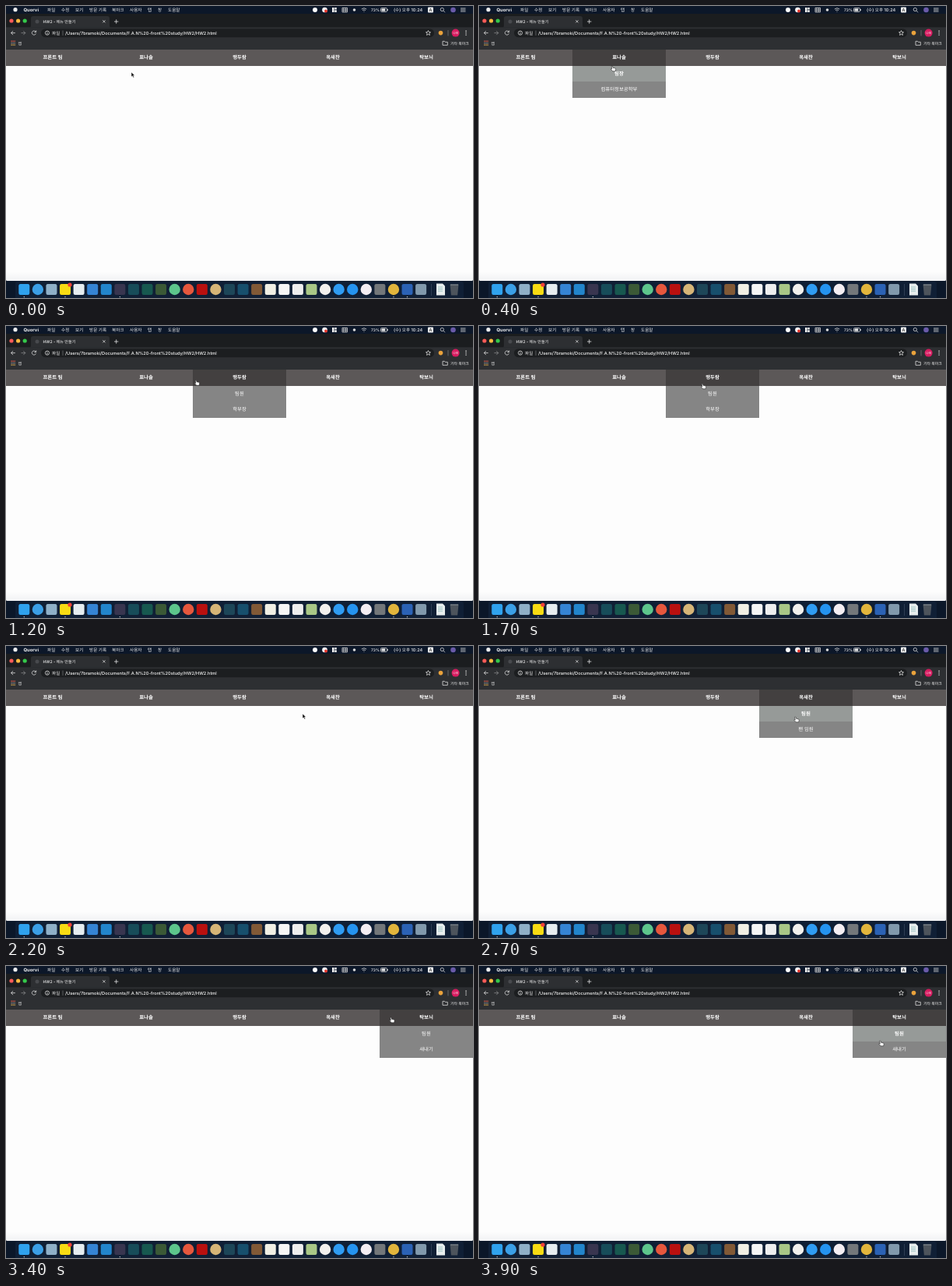
An HTML page that plays this animation: 600x375 px, repeating every 4 s.

```html
<!DOCTYPE html>
<html lang="ko">
<head>
<meta charset="utf-8">
<style>
html, body { margin: 0; width: 100%; height: 100%; overflow: hidden; background: #0b1729; }
svg { display: block; width: 600px; height: 375px; }
text { font: 5.6px Inter, "Noto Sans CJK KR", "Noto Sans CJK", sans-serif; fill: #f4f4f4; text-rendering: geometricPrecision; }
.line { fill: none; stroke: #dedede; stroke-width: .8; }
#nav text, #sub text { font-size: 6.4px; text-anchor: middle; fill: #fff; }
#nav text, #sub text.bold { font-weight: 700; }
</style>
</head>
<body>
<svg id="stage" viewBox="0 0 600 375">
  <defs>
    <linearGradient id="shade" x2="0" y2="1">
      <stop stop-color="#fdfdfd"/><stop offset="1" stop-color="#f1f2f4"/>
    </linearGradient>
  </defs>

  <!-- menu bar -->
  <rect width="600" height="10" fill="#0c1729"/>
  <circle cx="12" cy="4.7" r="2.6" fill="#eee"/>
  <g id="menus"></g>
  <circle cx="397" cy="5" r="3" fill="#fff"/>
  <circle cx="409.5" cy="5" r="3.3" fill="#fff"/><circle cx="411" cy="6.5" r="2" fill="#e5392f"/>
  <path d="M419 2h2.6v6H419zm3.2 0h2.6v2.6h-2.6zm0 3.3h2.6V8h-2.6z" fill="#eee"/>
  <path class="line" d="M432 2.4h6.5v5.4H432zM432 5.1h6.5M434 2.4v5.4m2.5-5.4v5.4"/>
  <circle cx="447.5" cy="5" r="1.8" fill="#ddd"/>
  <path class="line" d="M456.8 4q3.2-2.6 6.4 0m-5.1 1.6q1.9-1.5 3.8 0m-2.3 1.6h.8"/>
  <rect class="line" x="481.5" y="2.6" width="8" height="4.8" rx="1"/>
  <path d="M482.5 3.6h4.8v2.8h-4.8zM490 4.2h.9v1.6h-.9z" fill="#eee"/>
  <rect x="542" y="1.6" width="7" height="6.8" rx="1" fill="#eee"/>
  <text x="543.6" y="7" style="fill:#111">A</text>
  <path class="line" d="M562 6.2l2 2"/><circle class="line" cx="560.3" cy="4.5" r="2.1"/>
  <circle cx="574.5" cy="5" r="3.3" fill="#6a5aa8"/>
  <path class="line" d="M584 3h6.5M584 5h6.5M584 7h6.5"/>

  <!-- browser window -->
  <rect y="10" width="600" height="20" fill="#1b1d1f"/>
  <circle cx="7" cy="19" r="2.6" fill="#fc5b57"/>
  <circle cx="15.6" cy="19" r="2.6" fill="#fdbc40"/>
  <circle cx="24.2" cy="19" r="2.6" fill="#34c84a"/>
  <path d="M30 27.5q2 0 2-2.5v-9q0-3 3-3h95q3 0 3 3v9q0 2.5 2 2.5z" fill="#2d2f32"/>
  <circle cx="40" cy="20" r="2.5" fill="#484a4e"/>
  <path class="line" d="M124.3 18.2l3.2 3.2m0-3.2l-3.2 3.2M139 20h5.4M141.7 17.3v5.4"/>
  <rect y="27.3" width="600" height="28.7" fill="#2d2f32"/>
  <rect x="45" y="29.2" width="505" height="11" rx="5.5" fill="#1c1e20"/>
  <path class="line" d="M11.8 34.6H6.6m2.4-2.5l-2.5 2.5 2.5 2.5"/>
  <path class="line" d="M19.5 34.6h5.2m-2.4-2.5l2.5 2.5-2.5 2.5" opacity=".5"/>
  <path class="line" d="M38.2 33.2a2.6 2.6 0 1 0 .2 2.2M38.7 31.4v2.2h-2.2"/>
  <circle class="line" cx="53" cy="34.6" r="2.6"/><path class="line" d="M53 34.2v2M53 32.7v.7"/>
  <path class="line" d="M73 31.5v6.4M568 31v7.4" opacity=".4"/>
  <path class="line" d="M542.5 31.5l.9 2 2.1.2-1.6 1.5.5 2.2-1.9-1.2-1.9 1.2.5-2.2-1.6-1.5 2.1-.2z"/>
  <circle cx="558.5" cy="34.6" r="2.8" fill="#e9a23b"/>
  <circle cx="577.6" cy="34.6" r="5" fill="#d81b60"/>
  <path d="M590.4 31.6h1.3v1.3h-1.3zm0 2.4h1.3v1.3h-1.3zm0 2.4h1.3v1.3h-1.3z" fill="#ddd"/>
  <g fill="none" stroke-width="1.4" stroke-dasharray="1.4 .6">
    <path d="M6.5 45.2h5.4" stroke="#c8584c"/>
    <path d="M6.5 47.6h5.4" stroke="#8d8f93"/>
    <path d="M6.5 50h5.4" stroke="#c69a4c"/>
  </g>
  <path class="line" d="M561 45.3h2.5l.8 1h3v4H561z"/>
  <g id="labels"></g>
  <path d="M0 56h600v295q0 2-2 2H2q-2 0-2-2z" fill="#fdfdfd"/>
  <path d="M0 341h600v10q0 2-2 2H2q-2 0-2-2z" fill="url(#shade)"/>
  <g id="nav"></g>
  <g id="sub"></g>

  <!-- dock -->
  <rect x="12" y="354" width="576" height="23" rx="3" fill="#101f35"/>
  <g id="dock"></g>
  <path d="M546.5 357v15" stroke="#45526a" stroke-width=".6"/>
  <path d="M553 356.5h8l3 3v12h-11z" fill="#e8eeee"/>
  <path d="M555 361h6m-6 2.5h6m-6 2.5h6" stroke="#83b5b4" stroke-width=".8"/>
  <path d="M570.5 357.5h11l-1.4 14h-8.2z" fill="#4d545c"/>
  <path d="M571 358h10" stroke="#8b9299"/>

  <path id="arrow" d="M0 0v6l1.4-1.2 1.1 2.3 1.1-.5-1.1-2.3h1.9z" fill="#111" stroke="#fff" stroke-width=".5"/>
  <path id="hand" d="M-.8.2q.9-.7 1.3.3l.5 1.7 2.6.6q1.3.3 1.1 1.6l-.5 2.4H.8L-1.6 4.3q-.1-1 .9-.6l.5.4z"
    fill="#fff" stroke="#222" stroke-width=".6"/>
</svg>
<script>
const $ = id => document.getElementById(id);

function add(parent, tag, attrs, content = "") {
  const node = document.createElementNS("http://www.w3.org/2000/svg", tag);
  for (const key in attrs) node.setAttribute(key, attrs[key]);
  node.textContent = content;
  return parent.appendChild(node);
}
const label = (parent, x, y, content, size = 5.6, weight = 500) =>
  add(parent, "text", { x, y, style: `font-size:${size}px;font-weight:${weight}` }, content);

label($("menus"), 22.5, 6.8, "Quorvi", 5.9, 700);
[[53, "파일"], [71, "수정"], [89, "보기"], [107, "방문 기록"], [136, "북마크"], [159, "사용자"],
 [182, "탭"], [195, "창"], [208, "도움말"], [498, "(수) 오후 10:24"]]
  .forEach(([x, name]) => label($("menus"), x, 6.8, name));
label($("menus"), 469, 6.8, "73%", 5);

label($("labels"), 47.5, 21.8, "HW2 - 메뉴 만들기", 5.1);
label($("labels"), 59, 36.6, "파일", 5.6);
label($("labels"), 76, 36.6, "/Users/7bramoki/Documents/F.A.N%20-front%20study/HW2/HW2.html", 5.65);
label($("labels"), 574, 36, "나래", 3.9);
label($("labels"), 15.5, 49.6, "앱", 5);
label($("labels"), 571, 49.6, "기타 북마크", 4.9);

const menu = [
  ["프론트 팀"],
  ["표나솔", "팀장", "컴퓨터정보공학부"],
  ["맹두람", "팀원", "학부장"],
  ["옥새찬", "팀원", "팬 임원"],
  ["탁보늬", "팀원", "새내기"],
];
const COL = 120, TOP = 56, ROW = 20.67;
const rowTop = row => Math.round(TOP + row * ROW);

// Each cell is a rectangle with a centred caption.
function cell(parent, x, row) {
  const y = rowTop(row);
  const box = add(parent, "rect", { x, y, width: COL, height: rowTop(row + 1) - y });
  const caption = add(parent, "text", { x: x + COL / 2, y: TOP + row * ROW + 12.1 });
  return { box, caption };
}
const heads = menu.map(([name], i) => {
  const head = cell($("nav"), i * COL, 0);
  head.caption.textContent = name;
  return head;
});
const rows = [1, 2].map(row => cell($("sub"), 0, row));

// Dock: colour, then o for a round icon or s for a square one.
const icons = ("s#2fa2ee o#3b9fe6 s#8fb0c8 s#f8dc13 s#e6edf0 s#3584d4 s#2285cb s#38354f s#174c59 s#17584f " +
  "s#3b5936 o#5dc68c o#e6573d s#b9100f o#d6b577 s#1d4658 s#174f6c s#815936 s#f1efe4 s#f6f6f6 " +
  "s#eeeeee s#a9c786 o#f2f0ed o#2f9cf3 o#2493f0 o#f4eef3 s#73777a o#e2b53c s#2b62b5 s#8199ac").split(" ");
icons.forEach((icon, i) => {
  const x = 23.3 + i * 17.58, fill = icon.slice(1);
  if (icon[0] === "o") add($("dock"), "circle", { cx: x, cy: 364, r: 7.2, fill });
  else add($("dock"), "rect", { x: x - 7, y: 357, width: 14, height: 14, rx: 2.2, fill });
  if ([0, 3, 7, 27, 28].includes(i)) add($("dock"), "circle", { cx: x, cy: 373.6, r: .7, fill: "#ddd" });
});
add($("dock"), "circle", { cx: 82, cy: 358, r: 2.6, fill: "#f0413a" });

// Pointer path: time, x, y, and whether a menu below the bar stays open.
const path = [
  [0, 161, 85, 0], [150, 163, 80, 0], [300, 168, 68, 1], [500, 174, 86, 1], [800, 181, 102.5, 1],
  [950, 186, 103, 1], [1100, 218, 72, 1], [1300, 270, 67, 1], [1450, 285, 88, 1], [1580, 287, 103, 1],
  [1700, 287, 74, 1], [1850, 310, 86, 1], [2100, 360, 90, 0], [2200, 381, 87, 0], [2400, 394, 70, 1],
  [2500, 402, 72, 1], [2700, 406.5, 91, 1], [2850, 412, 104, 1], [3000, 420, 103, 1], [3200, 455, 70, 1],
  [3400, 494.5, 66, 1], [3600, 503, 71, 1], [3900, 515.5, 96, 1], [4000, 515.5, 96, 1],
];

function pointerAt(time) {
  const i = path.findIndex(key => key[0] > time);
  const [t0, x0, y0, inside] = path[i - 1], [t1, x1, y1] = path[i];
  const k = (time - t0) / (t1 - t0);
  return { x: x0 + (x1 - x0) * k, y: y0 + (y1 - y0) * k, inside };
}

function render(time) {
  const { x, y, inside } = pointerAt(time);
  const row = Math.floor((y - TOP) / ROW);
  const open = inside || row === 0 ? Math.floor(x / COL) : -1;

  heads.forEach(({ box }, i) => box.setAttribute("fill", i === open ? "#434040" : "#5c5858"));
  $("sub").style.display = open > 0 ? "" : "none";
  if (open > 0) {
    $("sub").setAttribute("transform", `translate(${open * COL})`);
    rows.forEach(({ box, caption }, i) => {
      const hovered = row === i + 1;
      box.setAttribute("fill", hovered ? "#969a98" : "#858585");
      caption.textContent = menu[open][i + 1];
      caption.classList.toggle("bold", hovered);
    });
  }
  for (const id of ["arrow", "hand"]) {
    $(id).setAttribute("transform", `translate(${x} ${y})`);
    $(id).style.display = (id === "hand") === (open >= 0) ? "" : "none";
  }
}

function tick() {
  render(Math.floor(performance.now() % 4000 / 100) * 100);
  requestAnimationFrame(tick);
}
tick();
</script>
</body>
</html>
```
